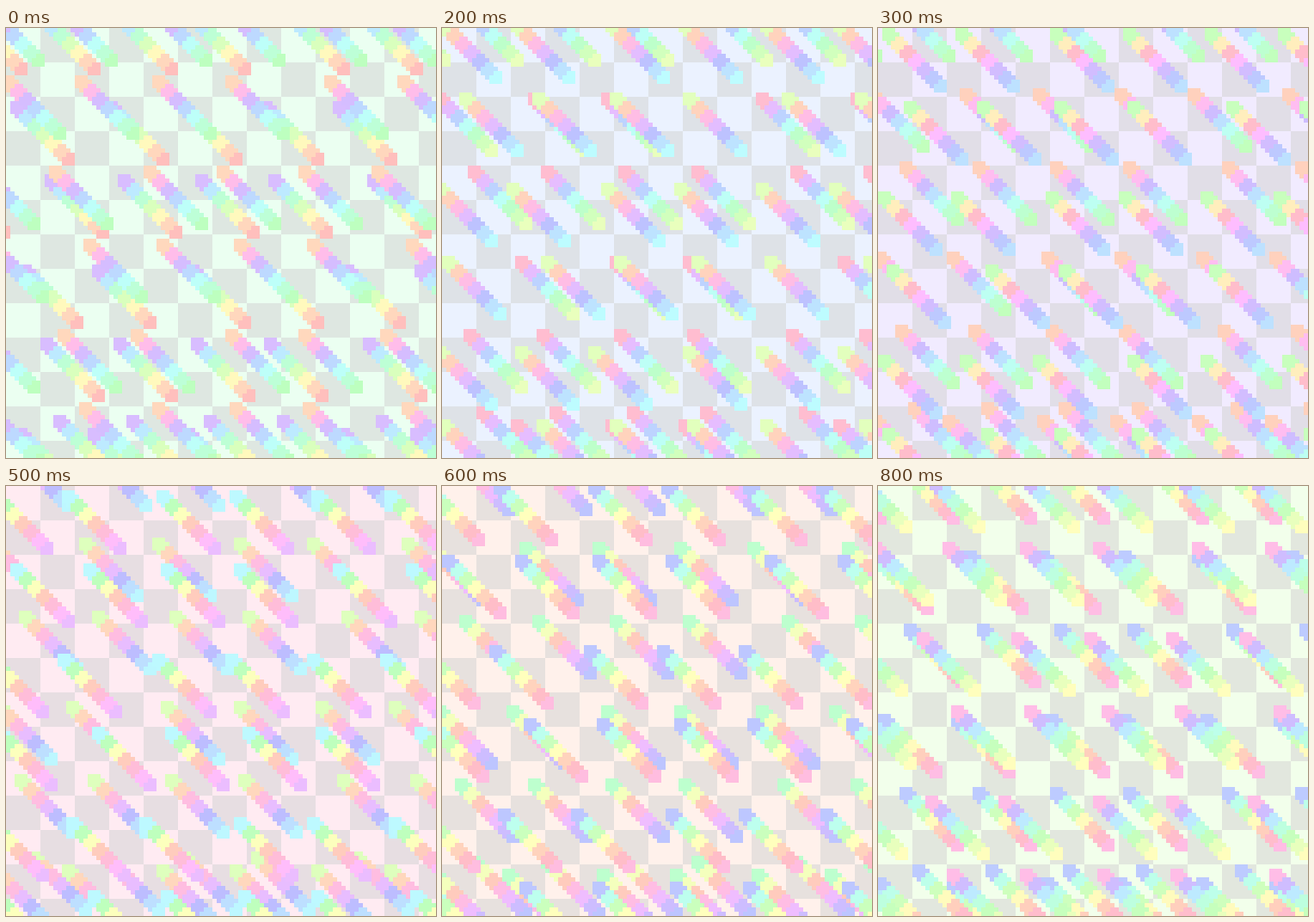
Recreate the animation shown at these times as an HTML page with a canvas. Size 500 by 500 pixels, loop 900 ms.

```html
<!DOCTYPE html>
<html lang="en">
<head>
<meta charset="utf-8">
<title>Pastel streaks</title>
<style>
  html, body { margin: 0; width: 100%; height: 100%; overflow: hidden; }
  canvas { display: block; width: 100vw; height: 100vh; image-rendering: pixelated; }
</style>
</head>
<body>
<canvas width="100" height="100"></canvas>
<script>
const ctx = document.querySelector('canvas').getContext('2d');
const SIZE = 100, TILE = 8, PERIOD = 75, ROWS = 6;
const STEPS = 13, BANDS = 7, HUE_SPAN = 263;
const STEP_MS = 100, STEP_COUNT = 9;

// Offsets of the four streaks within one period
const even = [0, 17, 35, 52];
const loose = [0, 22, 39, 58];

// Closed paths through a few key poses; side puts a layer below (1) or above (-1) each row line
const layers = [
  { side: 1, keys: [
    { t: 0, x: 0, y: 0, hue: 265 },
    { t: 1, x: -2, y: -1, hue: 307 },
    { t: 5, x: -6, y: -5, hue: 450 },
    { t: 8, x: -3, y: -2, hue: 587 },
    { t: 9, x: 0, y: 0, hue: 625 }
  ] },
  { side: -1, keys: [
    { t: 0, x: 0, y: 0, hue: 25 },
    { t: 1, x: 3, y: 1, hue: 62 },
    { t: 3, x: 7, y: 6, hue: 110 },
    { t: 5, x: 2, y: 7, hue: 185 },
    { t: 8, x: -1, y: 2, hue: 322 },
    { t: 9, x: 0, y: 0, hue: 385 }
  ] }
];

function poseAt(keys, t) {
  const next = keys.findIndex(key => key.t > t);
  const a = keys[next - 1], b = keys[next];
  const mix = name => a[name] + (b[name] - a[name]) * (t - a.t) / (b.t - a.t);
  return { x: Math.round(mix('x')), y: Math.round(mix('y')), hue: mix('hue') };
}

function drawChecker(step) {
  const hue = 138 + 40 * step;
  ctx.fillStyle = `hsl(${hue}, 100%, 96%)`;
  ctx.fillRect(0, 0, SIZE, SIZE);
  ctx.fillStyle = `hsl(${hue}, 16%, 89%)`;
  for (let row = 0; row * TILE < SIZE; row++) {
    for (let col = (row + 1) % 2; col * TILE < SIZE; col += 2) {
      ctx.fillRect(col * TILE, row * TILE, TILE, TILE);
    }
  }
}

// The hue falls quickly near the head and slows towards the tail
function bandColor(hue, band) {
  const u = band / (BANDS - 1);
  return `hsl(${hue - HUE_SPAN * u * (1.6 - 0.6 * u) + 360}, 100%, 87%)`;
}

function drawStreak(x, y, hue) {
  ctx.fillStyle = bandColor(hue, 0);
  ctx.fillRect(x - 1, y - 1, 3, 3);
  for (let i = 1; i < STEPS; i++) {
    // A square without its top left corner
    ctx.fillStyle = bandColor(hue, Math.floor(i * BANDS / STEPS));
    ctx.fillRect(x + i, y + i - 1, 2, 3);
    ctx.fillRect(x + i - 1, y + i, 3, 2);
  }
}

function drawRow(start, y, spacing, pose) {
  for (let base = start - PERIOD; base < SIZE + PERIOD; base += PERIOD) {
    for (const gap of spacing) drawStreak(base + gap + pose.x, y + pose.y, pose.hue);
  }
}

// Rows lean to the right; every fourth one starts a new block
function drawLayer({ side, keys }, step) {
  const pose = poseAt(keys, step);
  for (let row = 0; row < ROWS; row++) {
    const odd = row % 2;
    const isLoose = (side > 0) === (odd === 1);
    const shifted = isLoose ? row - 1 : row;
    const block = Math.floor(shifted / 4);
    const start = (isLoose ? 2 : -9) + Math.floor(9.5 * (shifted - 4 * block)) + 18 * block;
    const y = 19 * row - 4 + side * (1 + 2 * odd);
    drawRow(start, y, isLoose ? loose : even, pose);
  }
  // The lower layer crowds one more row in at the bottom
  if (side > 0) drawRow(12, 91, even, pose);
}

let shown = -1;
function render() {
  const step = Math.floor(performance.now() / STEP_MS) % STEP_COUNT;
  if (step !== shown) {
    shown = step;
    drawChecker(step);
    for (const layer of layers) drawLayer(layer, step);
  }
  requestAnimationFrame(render);
}
render();
</script>
</body>
</html>
```
